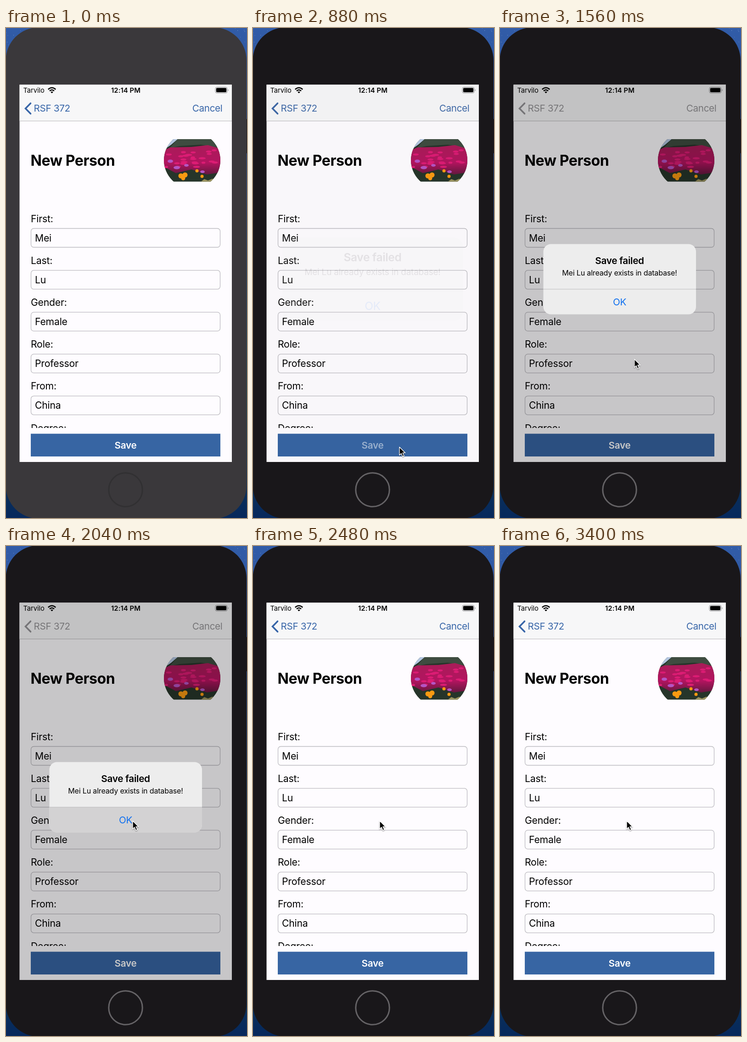
Recreate the animation shown at these times as an HTML page. Size 525x1067 px, loop 3440 ms.

```html
<!DOCTYPE html>
<html lang="en">
<head>
<meta charset="utf-8">
<title>Save form</title>
<style>
  html, body { margin: 0; width: 100%; height: 100%; overflow: hidden; background: #19171a; }
  svg { display: block; width: 100vw; height: 100vh; }
  text { font-family: Inter, "Liberation Sans", sans-serif; font-optical-sizing: none; font-size: 21.2px; letter-spacing: -.2px; }
  .nav { font-size: 20.7px; letter-spacing: -.35px; }
  .status { font-size: 14.8px; letter-spacing: -.1px; }
  .title { font-size: 32px; font-weight: 700; letter-spacing: -.4px; }
  .head { font-size: 20.7px; font-weight: 600; letter-spacing: -.3px; }
  .body { font-size: 16px; letter-spacing: -.16px; }
  .mid { text-anchor: middle; }
</style>
</head>
<body>
<svg viewBox="0 0 525 1067" preserveAspectRatio="none">
  <defs>
    <linearGradient id="sky" x1="0" y1="0" x2="0" y2="1">
      <stop offset="0" stop-color="#315ca8"/>
      <stop offset=".4" stop-color="#274a83"/>
      <stop offset=".75" stop-color="#174a55"/>
      <stop offset="1" stop-color="#06285c"/>
    </linearGradient>
    <linearGradient id="flowers" x1="0" y1="0" x2="0" y2="1">
      <stop offset="0" stop-color="#a91c58"/>
      <stop offset=".6" stop-color="#b31460"/>
      <stop offset="1" stop-color="#65183f"/>
    </linearGradient>
    <clipPath id="round"><circle cx="405.5" cy="288" r="61.5"/></clipPath>
    <clipPath id="band"><rect x="340" y="242" width="130" height="92.5"/></clipPath>
    <clipPath id="scroll"><rect x="30" y="203" width="462" height="668"/></clipPath>
    <filter id="shade" x="-50%" y="-50%" width="220%" height="220%">
      <feDropShadow dx="0" dy="1.5" stdDeviation="1.2" flood-opacity=".4"/>
    </filter>
  </defs>

  <rect width="525" height="1067" fill="url(#sky)"/>
  <g id="stars" fill="#8fa9dc"></g>
  <rect x="522" y="198" width="3" height="75" rx="1" fill="#151317"/>
  <rect id="shell" x="-.5" y="-1.5" width="524.5" height="1070" rx="72"/>
  <circle id="home" cx="260.5" cy="1005.5" r="36.7" fill="none" stroke-width="3"/>

  <rect x="29.5" y="123.5" width="462.5" height="821.5" fill="#fefcff"/>
  <rect x="29.5" y="123.5" width="462.5" height="79" fill="#f7f7f8"/>
  <path d="M29.5 202.5H492" stroke="#b7b7ba"/>

  <text class="status" x="37.5" y="141">Tarvilo</text>
  <g fill="none" stroke="#000" stroke-width="2.5">
    <path d="M91.8 133.7Q100 126.3 108.2 133.7"/>
    <path d="M95 137Q100 132.4 105 137"/>
  </g>
  <path d="M97.2 139.3Q100 137 102.8 139.3L100 142.3Z"/>
  <text class="status mid" x="261" y="141" font-weight="600" style="letter-spacing:.1px">12:14 PM</text>
  <rect x="456" y="128.8" width="26" height="13" rx="3.6" fill="none" stroke="#8e8e90"/>
  <rect x="457.8" y="130.6" width="22.4" height="9.4" rx="2"/>
  <path d="M483.6 133.2Q486 135.3 483.6 137.6Z" fill="#8e8e90"/>

  <g id="tint">
    <path d="M53.5 164L42.5 175.3L53.5 186.6" fill="none" stroke="currentColor" stroke-width="3.6" stroke-linecap="round"/>
    <g fill="currentColor">
      <text class="nav" x="60.5" y="182.3">RSF 372</text>
      <text class="nav" x="471.5" y="182.3" text-anchor="end">Cancel</text>
    </g>
  </g>

  <text class="title" x="53.5" y="300">New Person</text>
  <g clip-path="url(#band)"><g clip-path="url(#round)">
    <rect x="340" y="242" width="130" height="93" fill="#26352a"/>
    <path d="M340 242H374L360 254L340 268Z" fill="#b4c6e0"/>
    <path d="M374 242H470V262L424 254L378 257L356 262Z" fill="#3e4c40"/>
    <path d="M340 268L358 260L404 259L440 255L470 264V314L438 319L404 308L370 316L340 300Z" fill="url(#flowers)"/>
    <g id="blooms" fill="#dc1c74"></g>
    <g fill="#b455c4">
      <ellipse cx="358" cy="290" rx="6" ry="3.5"/>
      <ellipse cx="372" cy="304" rx="7" ry="3.5"/>
      <ellipse cx="393" cy="299" rx="5" ry="3"/>
      <ellipse cx="428" cy="313" rx="5" ry="3"/>
    </g>
    <g fill="#f99a12">
      <circle cx="381" cy="322" r="5.5"/>
      <circle cx="390" cy="320" r="5.5"/>
      <circle cx="386" cy="327" r="4.5"/>
      <circle cx="416" cy="311" r="3.5"/>
      <circle cx="427" cy="323" r="3.5"/>
    </g>
    <path d="M424 335L432 329L440 332L450 328L456 335Z" fill="#9b9460"/>
  </g></g>

  <g id="form" clip-path="url(#scroll)"></g>
  <rect x="54" y="883.5" width="413" height="49.5" fill="#3765a3"/>
  <text id="save" class="head mid" x="260.5" y="915.5" fill="#fff">Save</text>

  <rect id="scrim" x="29.5" y="123.5" width="462.5" height="821.5"/>

  <g id="alert">
    <rect x="94.5" y="470.5" width="332.5" height="153" rx="16.5" fill="#ededed"/>
    <path id="press" d="M94.5 569H427V607A16.5 16.5 0 0 1 410.5 623.5H111A16.5 16.5 0 0 1 94.5 607Z" fill="#d3d2d3"/>
    <path d="M94.5 568.7H427" stroke="#bdbcbe"/>
    <text class="head mid" x="260.5" y="514.3">Save failed</text>
    <text class="body mid" x="260.5" y="539">Mei Lu already exists in database!</text>
    <text class="nav mid" x="260.5" y="604" fill="#1070ef">OK</text>
  </g>

  <g id="cursor" filter="url(#shade)">
    <path d="M0 0V17.6L4 13.9L6.9 20.6L10 19.3L7.1 12.7H12.7Z" fill="#000" stroke="#fff" stroke-width="1.3" stroke-linejoin="round"/>
  </g>
</svg>
<script>
  const LOOP = 3440;
  const $ = id => document.getElementById(id);
  const set = (id, attrs) => {
    for (const key in attrs) $(id).setAttribute(key, attrs[key]);
  };
  const clamp = x => Math.min(1, Math.max(0, x));
  const mix = (a, b, p) => a + (b - a) * p;
  const span = (t, from, to) => clamp((t - from) / (to - from));
  const smooth = x => x * x * (3 - 2 * x);

  // Critically damped spring from 0 to 1
  const spring = ms => {
    const x = Math.max(0, ms) * 0.0228;
    return 1 - Math.exp(-x) * (1 + x);
  };

  let seed = 7;
  const random = () => (seed = seed * 16807 % 2147483647) / 2147483647;

  const fields = [["First", "Mei"], ["Last", "Lu"], ["Gender", "Female"],
    ["Role", "Professor"], ["From", "China"], ["Degree", ""]];
  $("form").innerHTML = fields.map(([label, value], i) => {
    const y = 436.5 + i * 91.2;
    return `<text x="54" y="${y - 14}">${label}:</text>
      <rect x="54.5" y="${y}" width="412" height="41" rx="6" fill="#fefcff" stroke="#bdbcc1" stroke-width="1.3"/>
      <text x="63" y="${y + 28}">${value}</text>`;
  }).join("");

  for (let i = 0; i < 24; i++) {
    const x = 348 + random() * 116, y = 264 + random() * 42;
    $("blooms").innerHTML += `<ellipse cx="${x}" cy="${y}" rx="${4 + random() * 4}" ry="2.3"/>`;
  }
  for (let i = 0; i < 24; i++) {
    const x = (i % 2 ? 475 : 0) + random() * 50, y = random() * 40;
    $("stars").innerHTML += `<circle cx="${x}" cy="${y}" r=".7" opacity="${0.3 + random() * 0.5}"/>`;
  }

  const waypoints = [[240, 528, 985], [580, 319, 912.5], [1240, 319, 912.5], [1800, 276, 598.5]];
  function cursorAt(t) {
    let [, x, y] = waypoints[0];
    for (let i = 1; i < waypoints.length; i++) {
      const p = smooth(span(t, waypoints[i - 1][0], waypoints[i][0]));
      x = mix(x, waypoints[i][1], p);
      y = mix(y, waypoints[i][2], p);
    }
    return [x, y];
  }

  const BLUE = [55, 101, 168], GRAY = [149, 148, 151];
  const CLICK = 780, SHOW = 860, HIDE = 2100;

  function draw(t) {
    const active = t >= CLICK;
    set("shell", { fill: active ? "#19171a" : "#3a383b" });
    set("home", { stroke: active ? "#656366" : "#313032" });

    const shown = spring(t - SHOW);
    const level = t < HIDE ? shown : 1 - spring(t - HIDE);
    set("scrim", { opacity: level * 0.215 });
    const rgb = BLUE.map((c, i) => Math.round(mix(c, GRAY[i], level)));
    set("tint", { color: `rgb(${rgb})` });

    const scale = 1 + 0.2 * (1 - shown);
    set("alert", {
      opacity: level,
      transform: `translate(260.75 547) scale(${scale}) translate(-260.75 -547)`
    });
    set("press", { opacity: t >= 1960 && t < HIDE ? 1 : 0 });

    const saveAlpha = active ? mix(0.5, 1, smooth(span(t, 900, 1240))) : 1;
    set("save", { opacity: saveAlpha });

    const [x, y] = cursorAt(t);
    set("cursor", {
      transform: `translate(${x} ${y})`,
      visibility: t < waypoints[0][0] ? "hidden" : "visible"
    });
  }

  const start = performance.now();
  function frame(now) {
    draw(Math.max(0, now - start) % LOOP);
    requestAnimationFrame(frame);
  }
  draw(0);
  requestAnimationFrame(frame);
</script>
</body>
</html>
```
